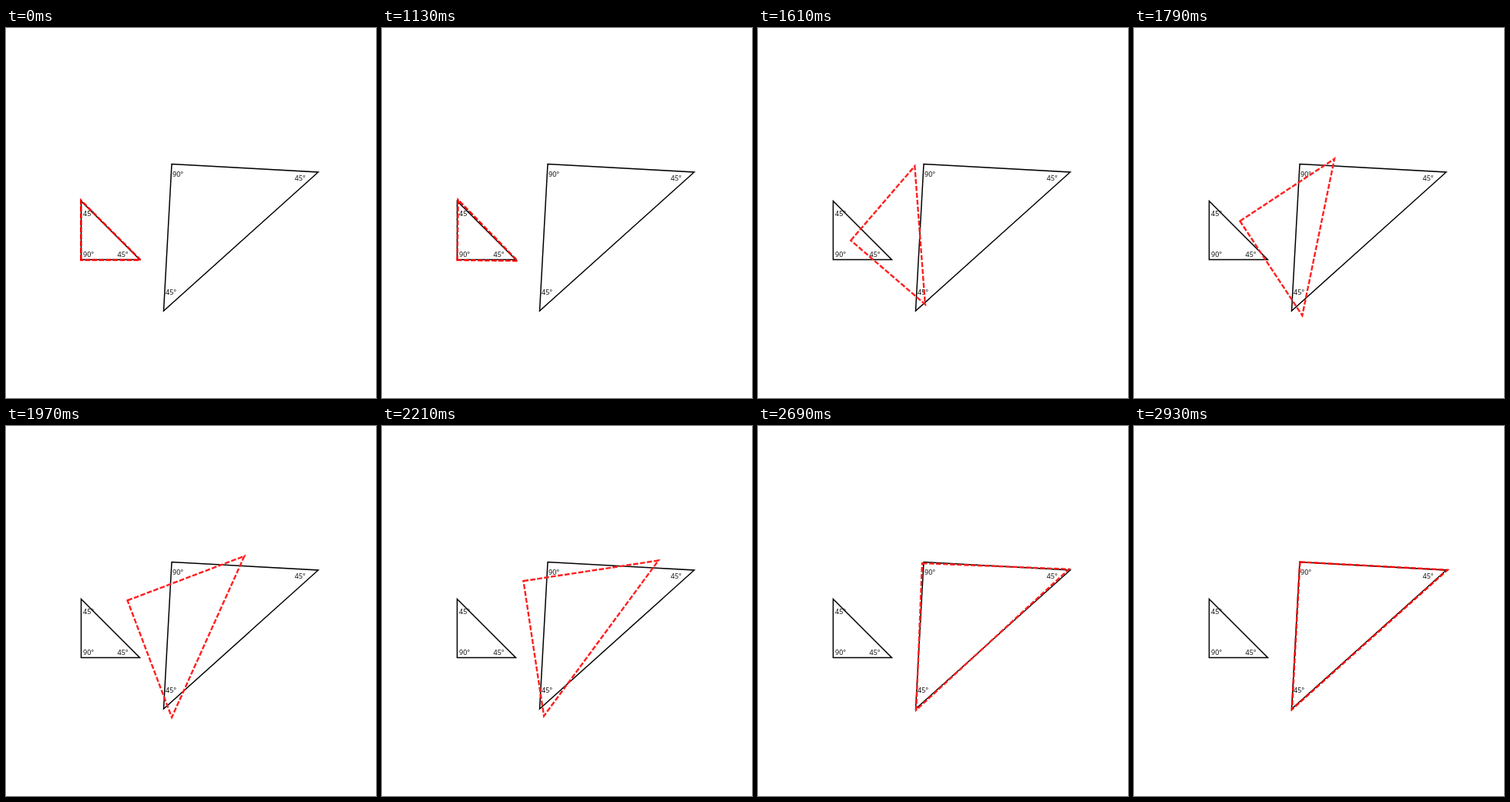
An HTML page that plays this animation: 480 by 480 pixels, repeating every 4.13 s.

```html
<!DOCTYPE html>
<html lang="en">
<head>
<meta charset="utf-8">
<title>Similar triangles</title>
<style>
  html, body { margin: 0; width: 100%; height: 100%; overflow: hidden; background: #fff; }
  svg { display: block; width: 100%; height: 100%; }
  .outline { fill: none; stroke: #000; stroke-width: 1.5; }
  #mover { fill: none; stroke-width: 2.4; stroke-dasharray: 6.6 2.4; }
  text { font: 9px "Open Sans", "Noto Sans", sans-serif; }
</style>
</head>
<body>
<svg viewBox="0 0 480 480">
  <path class="outline" d="M97.5 300.5V224.5L173.5 300.5Z"/>
  <path class="outline" d="M215 176.5L405 187L204.5 367Z"/>
  <text x="100" y="244">45°</text>
  <text x="100" y="296.5">90°</text>
  <text x="144.5" y="296.5">45°</text>
  <text x="216" y="192.5">90°</text>
  <text x="374.5" y="197.5">45°</text>
  <text x="207" y="345.7">45°</text>
  <path id="mover"/>
</svg>
<script>
  const LOOP = 4130, HOLD = 1130, STEP = 60, STEPS = 31;
  const CRUISE = 9, LEFT = 0.563, POWER = 2.47;
  const mover = document.getElementById("mover");
  const mix = (a, b, f) => a + (b - a) * f;

  function hermite(a, b, slopeA, slopeB, u) {
    const v = 1 - u;
    return v * v * ((1 + 2 * u) * a + u * slopeA) + u * u * ((3 - 2 * u) * b - v * slopeB);
  }

  // Quick start, then a long power-law slowdown.
  function progress(step) {
    if (step < 1) return 0;
    const run = STEPS - CRUISE;
    if (step >= CRUISE) return 1 - LEFT * ((STEPS - step) / run) ** POWER;
    const span = CRUISE - 1;
    return hermite(0.008, 1 - LEFT, 0.016 * span, LEFT * POWER / run * span, (step - 1) / span);
  }

  // Right isosceles triangle placed by the midpoint of its hypotenuse.
  function trianglePath(cx, cy, leg, degrees) {
    const radius = leg / Math.SQRT2;
    const corner = offset => {
      const a = (degrees + offset) * Math.PI / 180;
      return (cx + radius * Math.sin(a)).toFixed(2) + " " + (cy - radius * Math.cos(a)).toFixed(2);
    };
    return `M${corner(-135)}L${corner(-45)}L${corner(135)}Z`;
  }

  function draw(now) {
    const t = now % LOOP;
    const step = t < HOLD ? 0 : Math.min(STEPS, Math.floor((t - HOLD) / STEP) + 1);
    const f = progress(step);
    mover.setAttribute("d", trianglePath(
      mix(135.9, 305.7, f), mix(262.3, 277.2, f), mix(77.3, 191.5, f), mix(0, 93.1, f)));
    mover.setAttribute("stroke", step > 1 && step < STEPS ? "#ff2020" : "#ff0000");
  }

  const start = performance.now();
  function tick() {
    draw(performance.now() - start);
    requestAnimationFrame(tick);
  }
  tick();
</script>
</body>
</html>
```
